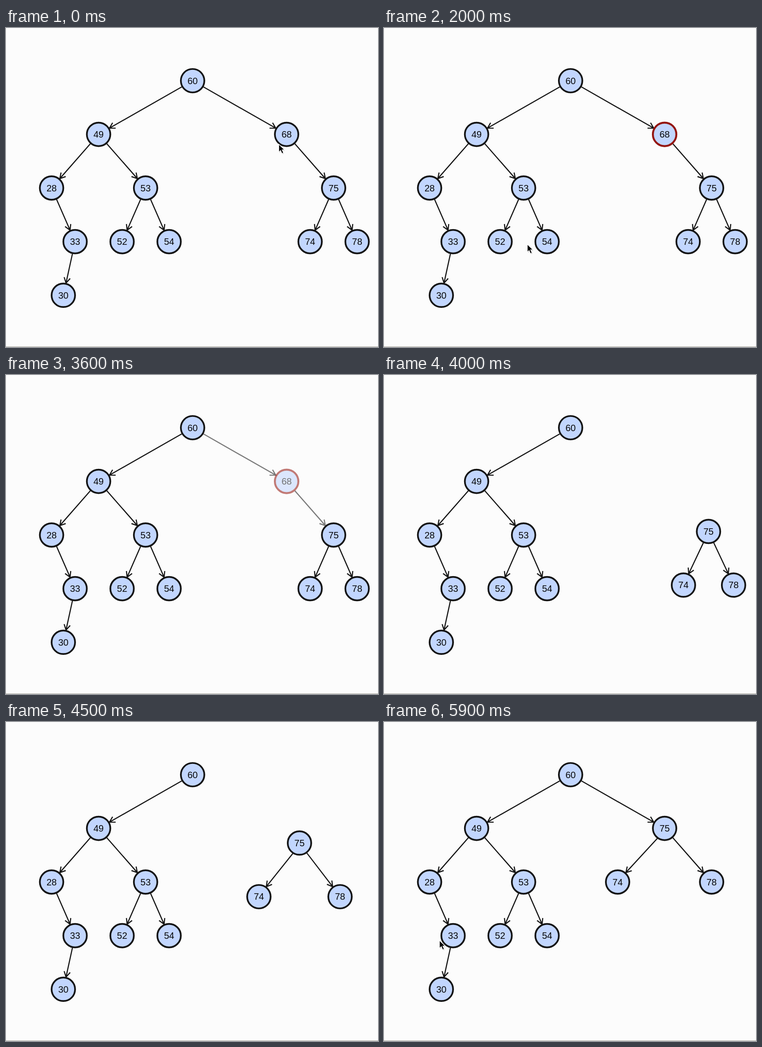
An HTML page for the animation above (6000 ms loop, 808 px wide and 693 px high).

```html
<!DOCTYPE html>
<html lang="en">
<head>
<meta charset="utf-8">
<title>Binary search tree deletion</title>
<style>
  html, body { margin: 0; width: 100%; height: 100%; overflow: hidden; background: #fcfcfc; }
  svg { display: block; width: 100vw; height: 100vh; }
  text { font: 20px "Liberation Sans", Arial, sans-serif; text-anchor: middle; fill: #080808; }
  .node circle { fill: #c2d6fe; stroke: #131313; stroke-width: 3.7; }
  .edge { fill: none; stroke: #151515; stroke-width: 2.4; }
</style>
</head>
<body>
<svg id="stage" viewBox="0 0 808 693">
  <rect width="808" height="693" fill="#fcfcfc"/>
  <rect y="692" width="808" height="1" fill="#a3a197"/>
  <g id="edges"></g>
  <g id="nodes"></g>
  <g id="arrow">
    <path d="M1.5 2.5V18.5L5.3 15L8.4 21.6L11.2 20.4L8.2 14H13.3Z" fill="#000" opacity=".18"/>
    <path d="M0 0V17L4 13.4L6.9 20.2L10.2 18.8L7.3 12.2H12.6Z" fill="#000" stroke="#fff" stroke-width="1.2"/>
  </g>
  <g id="hand">
    <path d="M-2.8 8.6V1.2Q-2.8-.8-1.1-.8T.6 1.2V6.2Q2.2 5 3.6 6.6Q5.4 5.6 6.5 7.3Q9.4 6.8 9.4 9.4V12.6Q9.2 15 7.6 16.8V19H-.8V17Q-3.6 13.6-5.4 11.2Q-6.4 9.2-4.9 8.5Q-3.8 8.1-2.8 9.4Z"
      fill="#fff" stroke="#111" stroke-width="1.2" stroke-linejoin="round"/>
    <path d="M.6 6V10M3.6 7V10.4M6.5 7.6V10.8M1.2 13V16.5M3.6 13V16.5M6 13V16.5" stroke="#111" fill="none"/>
  </g>
</svg>
<script>
const LOOP = 6000, STEP = 100, R = 27.2;
const NS = "http://www.w3.org/2000/svg";
const $ = id => document.getElementById(id);

function make(tag, parent, attrs = {}) {
  const el = document.createElementNS(NS, tag);
  for (const k in attrs) el.setAttribute(k, attrs[k]);
  return parent.appendChild(el);
}

const clamp = x => Math.max(0, Math.min(1, x));
const phase = (t, from, to) => clamp((t - from) / (to - from));
const sine = p => (1 - Math.cos(Math.PI * p)) / 2;
const lerp = (a, b, p) => a + (b - a) * p;
const mix = (a, b, p) => [lerp(a[0], b[0], p), lerp(a[1], b[1], p)];

// Grid cell (column, level) to stage position
const at = (col, level) => [99 + 51.05 * col, 114.5 + 116.55 * level];

const home = {
  60: at(6, 0), 49: at(2, 1), 68: at(10, 1), 28: at(0, 2), 53: at(4, 2), 75: at(12, 2),
  33: at(1, 3), 52: at(3, 3), 54: at(5, 3), 74: at(11, 3), 78: at(13, 3), 30: at(.5, 4)
};
const moved = { 75: at(10, 1), 74: at(8, 2), 78: at(12, 2) };

const nodes = {};
for (const key in home) {
  const g = make("g", $("nodes"), { class: "node" });
  const circle = make("circle", g, { r: 25.5 });
  make("text", g, { y: 7 }).textContent = key;
  nodes[key] = { g, circle };
  place(key, home[key]);
}

function place(key, [x, y]) {
  nodes[key].g.setAttribute("transform", `translate(${x} ${y})`);
}

// Segment between the rims of two nodes
function link(a, b) {
  const ang = Math.atan2(b[1] - a[1], b[0] - a[0]);
  const dx = R * Math.cos(ang), dy = R * Math.sin(ang);
  return [[a[0] + dx, a[1] + dy], [b[0] - dx, b[1] - dy]];
}

function drawEdge(el, [a, b]) {
  const ang = Math.atan2(b[1] - a[1], b[0] - a[0]);
  const barb = s => [b[0] - 13.5 * Math.cos(ang + s), b[1] - 13.5 * Math.sin(ang + s)];
  el.setAttribute("d", `M${a}L${b}M${barb(.52)}L${b}L${barb(-.52)}`);
}

function edge(a, b) {
  const el = make("path", $("edges"), { class: "edge" });
  drawEdge(el, link(home[a], home[b]));
  return el;
}

[[60, 49], [49, 28], [49, 53], [28, 33], [53, 52], [53, 54], [33, 30]].forEach(p => edge(...p));
const fading = [edge(60, 68), edge(68, 75), nodes[68].g];
const joined = edge(60, 68);
const sliding = [74, 78].map(key => {
  const from = link(home[75], home[key]);
  const to = link(moved[75], moved[key]);
  if (key === 74) to[0] = [to[0][0] + 2, to[0][1] + 1.5];
  return { el: edge(75, key), from, to };
});

function showCursor(el, pos) {
  el.style.display = pos ? "" : "none";
  if (pos) el.setAttribute("transform", `translate(${pos[0]} ${pos[1]})`);
}

function drawCursor(t) {
  let arrow = null, hand = null;
  const rest = [606.5, 239.5];
  if (t < 100) arrow = [592.5, 252.5];
  else if (t < 1700) hand = mix([596, 249], rest, sine(phase(t, 0, 700)));
  else if (t < 2400) {
    const pos = mix(rest, [16, 700], sine(phase(t, 1600, 2400)));
    if (Math.hypot(pos[0] - 609.5, pos[1] - 231) < R) hand = pos;
    else arrow = pos;
  } else if (t >= 5600) arrow = mix([29, 542], [120.5, 474.5], phase(t, 5600, 5900));
  showCursor($("arrow"), arrow);
  showCursor($("hand"), hand);
}

function render(t) {
  const picked = t >= 1400;
  nodes[68].circle.style.stroke = picked ? "#94150f" : "";
  nodes[68].circle.style.strokeWidth = picked ? 4.2 : "";

  const gone = phase(t, 3380, 3880);
  fading.forEach(el => el.setAttribute("opacity", 1 - gone));

  const p = sine(phase(t, 3829, 4862));
  for (const key in moved) place(key, mix(home[key], moved[key], p));
  sliding.forEach(s => drawEdge(s.el, [mix(s.from[0], s.to[0], p), mix(s.from[1], s.to[1], p)]));

  joined.setAttribute("opacity", phase(t, 4862, 5200));
  drawCursor(t);
}

const start = performance.now();
function tick() {
  const t = (performance.now() - start + 4) % LOOP;
  render(Math.floor(t / STEP) * STEP);
  requestAnimationFrame(tick);
}
tick();
</script>
</body>
</html>
```
